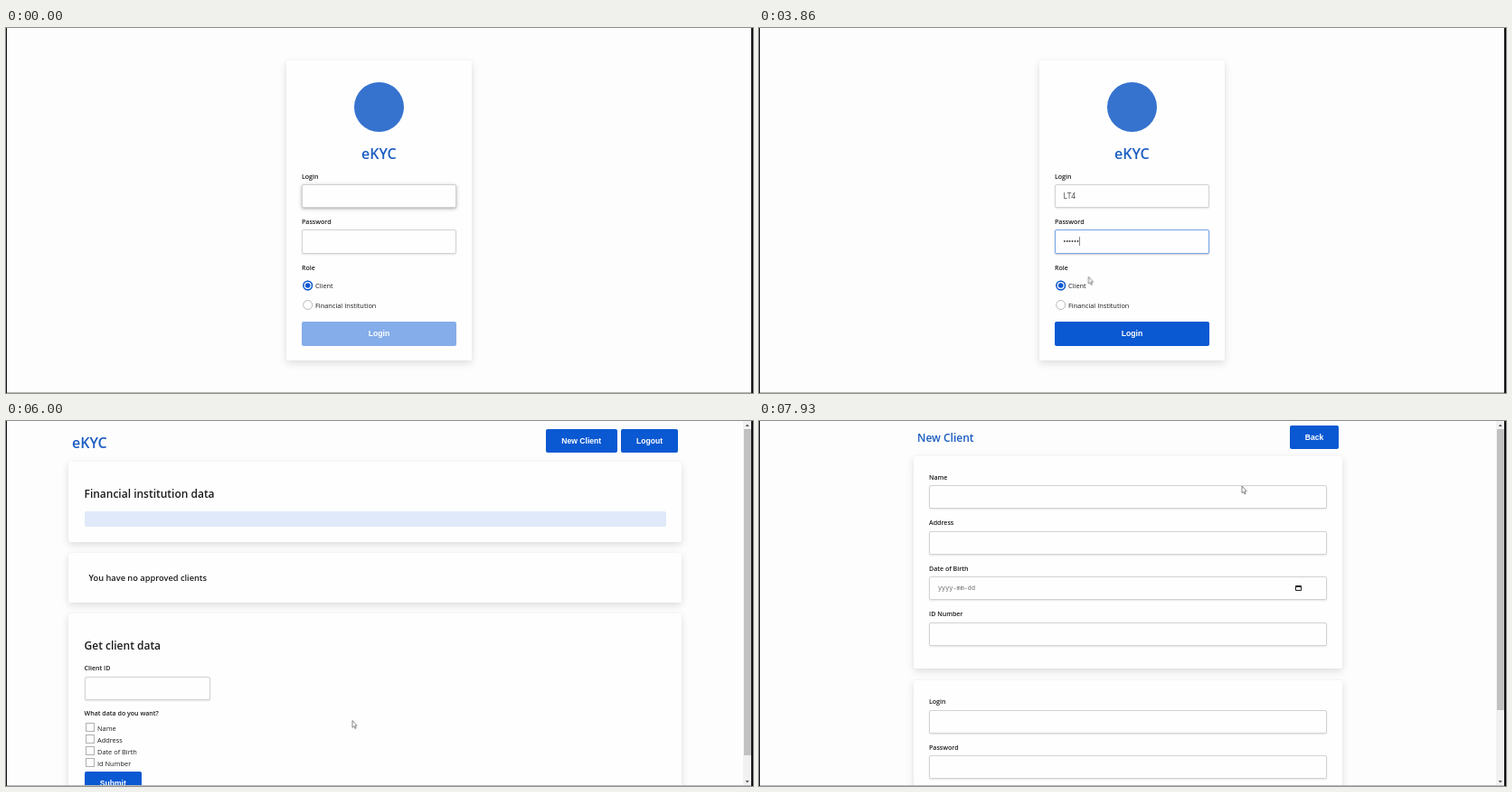
An HTML page for the animation above (8000 ms loop, 826x404 px).

```html
<!DOCTYPE html>
<html lang="en">
<head>
<meta charset="utf-8">
<title>eKYC</title>
<style>
html, body { margin: 0; width: 100%; height: 100%; overflow: hidden; background: #fdfdfd; }
body { position: relative; font-family: "Open Sans", "Noto Sans", sans-serif; color: #1c1c1c; --blue: #0a58d2; }
body * { box-sizing: border-box; }
.page, .group, .abs, p, .card, .input, .btn, .check { position: absolute; }
.page, .group { inset: 0; }

/* everything is placed by --x --y --w --h; text is centred on --y */
.abs, p, .card, .input, .btn, .check {
  left: calc(var(--x) * 1px); top: calc(var(--y) * 1px);
  width: calc(var(--w) * 1px); height: calc(var(--h) * 1px);
}
p { margin: -10px 0 0; width: auto; height: 20px; line-height: 20px; font-size: 7.4px; white-space: pre; }
.label { font-size: 7.05px; font-weight: 600; }
.title { font-size: 12px; font-weight: 600; }
.lead { font-size: 9.25px; font-weight: 600; }
.value { font-size: 8.2px; color: #333; }
.key { font-size: 8.1px; font-weight: 600; }
.brand { font-size: 16px; font-weight: 600; color: #1b5cc2; }
.card { background: #fefefe; border-radius: 2px; box-shadow: 0 3px 9px rgba(0,0,0,.13), 0 0 2px rgba(0,0,0,.06); }
.input { border: 1px solid #d2d2d2; border-radius: 2px; background: #fefefe; box-shadow: 0 1px 2px rgba(0,0,0,.1); }
.btn {
  display: flex; align-items: center; justify-content: center; border-radius: 2px; background: var(--blue);
  color: #fff; font: bold 8.6px "Liberation Sans", Arial, sans-serif;
}
.off { fill: #fefefe; stroke: #b0b0b0; stroke-width: .9; }
.over { fill: #fefefe; stroke: #1a5cc8; stroke-width: 1.3; }
.on { fill: #fefefe; stroke: var(--blue); stroke-width: 1.5; }
.dot { fill: var(--blue); }
.check { --x: 88; --w: 10; --h: 10; border: 1px solid #b0b0b0; }
.typed { height: 10px; line-height: 10px; font-size: 8.3px; color: #444; overflow: hidden; white-space: pre; border-right: 1px solid transparent; }
.secret { font: 7.2px/10px "Liberation Sans", Arial, sans-serif; letter-spacing: .42px; }

/* one shared loop */
.step, .move { animation: 8s step-end infinite; }
.move { animation-timing-function: ease-in-out; }
.login { animation-name: login; }
.dash { animation-name: dash; }
.new { animation-name: new; }
.waiting { animation-name: waiting; }
.loaded { animation-name: loaded; }
.shift { animation-name: shift; }
.track { animation-name: track; }
.thumb { animation-name: thumb; }
.hovered { animation-name: hovered; }
.focus1 { animation-name: focus1; }
.focus2 { animation-name: focus2; }
.user { animation-name: user; }
.secret { animation-name: secret; }
.client { animation-name: client; }
.inst { animation-name: inst; }
.inst-over { animation-name: instOver; }
.send { animation-name: send; animation-timing-function: linear; }
.send-text { animation-name: sendText; }
.busy { animation-name: busy; }
.cursor { left: 0; top: 0; animation-name: cursor; }
.ring { animation-name: ring; animation-timing-function: linear; }
.dark { animation-name: dark; }
.arrow { animation-name: arrow; }
.hand { animation-name: hand; }
.back { animation-name: back; animation-timing-function: linear; }

@keyframes login { 0% { opacity: 1 } 65.75%, 100% { opacity: 0 } }
@keyframes dash { 0% { opacity: 0 } 65.75% { opacity: 1 } 90.4%, 100% { opacity: 0 } }
@keyframes new { 0% { opacity: 0 } 90.4%, 100% { opacity: 1 } }
@keyframes waiting { 0% { opacity: 1 } 76.6%, 100% { opacity: 0 } }
@keyframes loaded { 0% { opacity: 0 } 76.6%, 100% { opacity: 1 } }
@keyframes shift { 0% { transform: none } 76.6%, 100% { transform: translateY(32px) } }
@keyframes track { 0% { opacity: 0 } 65.75%, 100% { opacity: 1 } }
@keyframes thumb {
  0% { opacity: 0; height: 361px } 65.75% { opacity: 1; height: 361px }
  76.6% { opacity: 1; height: 337px } 90.4%, 100% { opacity: 1; height: 311px }
}
@keyframes hovered { 0% { opacity: 1 } 43.75%, 100% { opacity: 0 } }
@keyframes focus1 { 0% { opacity: 0 } 8.25% { opacity: 1 } 26.6%, 100% { opacity: 0 } }
@keyframes focus2 { 0% { opacity: 0 } 26.6% { opacity: 1 } 55%, 100% { opacity: 0 } }
@keyframes user {
  0% { width: 1px; border-color: transparent } 8.25% { width: 1px; border-color: #888 }
  15% { width: 1px; border-color: transparent } 15.8% { width: 5.6px; border-color: #888 }
  16.6% { width: 10px; border-color: #888 } 17.5% { width: 16px; border-color: #888 }
  24.1%, 100% { width: 16px; border-color: transparent }
}
@keyframes secret {
  0% { width: 1px; border-color: transparent } 26.6% { width: 1px; border-color: #888 }
  33.2% { width: 1px; border-color: transparent } 35.7% { width: 4px; border-color: #888 }
  36.6% { width: 7px; border-color: #888 } 37.4% { width: 9.9px; border-color: #888 }
  40.7% { width: 12.8px; border-color: #888 } 41.6% { width: 15.8px; border-color: #888 }
  42.5% { width: 18.8px; border-color: #888 } 49.1%, 100% { width: 18.8px; border-color: transparent }
}
@keyframes client { 0% { opacity: 1 } 56.6%, 100% { opacity: 0 } }
@keyframes inst { 0% { opacity: 0 } 56.6%, 100% { opacity: 1 } }
@keyframes instOver { 0% { opacity: 0 } 50.8% { opacity: 1 } 56.6%, 100% { opacity: 0 } }
@keyframes send {
  0%, 42.5% { background: #84ade9 } 44.5%, 62.9% { background: #0a58d2 }
  63.8%, 100% { background: #3273da }
}
@keyframes sendText { 0% { opacity: 1 } 63.3%, 100% { opacity: 0 } }
@keyframes busy { 0% { opacity: 0 } 63.3%, 100% { opacity: 1 } }
@keyframes spin { to { transform: rotate(1turn) } }
@keyframes cursor {
  0%, .75% { transform: translate(358px, 196px) }
  4.1%, 42% { transform: translate(352px, 190px) }
  51.6%, 56.6% { transform: translate(368.5px, 304px) }
  61.5% { transform: translate(383px, 331.5px) }
  75.5% { transform: translate(383px, 331.5px); animation-timing-function: ease-in }
  82.5% { transform: translate(578px, 116px); animation-timing-function: ease-out }
  86.5%, 94.5% { transform: translate(634px, 22px) }
  99.1%, 100% { transform: translate(534px, 72px) }
}
@keyframes ring {
  0%, 8.24% { opacity: 0; transform: scale(1) }
  8.25% { opacity: .7; transform: scale(1) } 11.5% { opacity: 1; transform: scale(.35) }
  11.51%, 54.98% { opacity: 0; transform: scale(1) }
  54.99% { opacity: .7; transform: scale(1) } 58.25% { opacity: 1; transform: scale(.35) }
  58.26%, 62.49% { opacity: 0; transform: scale(1) }
  62.5% { opacity: .7; transform: scale(1) } 65.75% { opacity: 1; transform: scale(.35) }
  65.76%, 87.49% { opacity: 0; transform: scale(1) }
  87.5% { opacity: .7; transform: scale(1) } 90.75% { opacity: 1; transform: scale(.35) }
  90.76%, 100% { opacity: 0; transform: scale(1) }
}
@keyframes dark { 0% { opacity: 0 } .75% { opacity: 1 } 42.5%, 100% { opacity: 0 } }
@keyframes arrow {
  0% { opacity: 0 } 42.5% { opacity: 1 } 50.8% { opacity: 0 } 58.2% { opacity: 1 }
  60.2% { opacity: 0 } 65.75% { opacity: 1 } 85.4% { opacity: 0 } 96%, 100% { opacity: 1 }
}
@keyframes hand {
  0% { opacity: 0 } 50.8% { opacity: 1 } 58.2% { opacity: 0 } 60.2% { opacity: 1 }
  65.75% { opacity: 0 } 85.4% { opacity: 1 } 96%, 100% { opacity: 0 }
}
@keyframes back { 0%, 96.5% { background: #2f70d9 } 98.5%, 100% { background: #0a58d2 } }
</style>
</head>
<body>

<section class="page step login">
  <div class="card" style="--x:310;--y:36;--w:205;--h:332"></div>
  <div class="abs" style="--x:385;--y:60;--w:55;--h:55;border-radius:50%;background:#3673cf"></div>
  <p class="brand" style="--x:393;--y:138.5">eKYC</p>

  <p class="label" style="--x:327;--y:163.5">Login</p>
  <div class="input" style="--x:327;--y:173;--w:171;--h:26"></div>
  <div class="input step hovered" style="--x:327;--y:173;--w:171;--h:26;box-shadow:0 1px 4px rgba(0,0,0,.26)"></div>
  <div class="input step focus1" style="--x:327;--y:173;--w:171;--h:26;border-color:#74a3e8"></div>
  <div class="abs typed step user" style="--x:336.5;--y:181">LT4</div>

  <p class="label" style="--x:327;--y:214">Password</p>
  <div class="input" style="--x:327;--y:223;--w:171;--h:27"></div>
  <div class="input step focus2" style="--x:327;--y:223;--w:171;--h:27;border-color:#74a3e8"></div>
  <div class="abs typed step secret" style="--x:336.5;--y:231">••••••</div>

  <p class="label" style="--x:327;--y:264.5">Role</p>
  <svg class="abs" style="--x:0;--y:0;--w:826;--h:404">
    <circle class="off" cx="333.7" cy="285" r="5"/>
    <g class="step client"><circle class="on" cx="333.7" cy="285" r="4.8"/><circle class="dot" cx="333.7" cy="285" r="2.8"/></g>
    <circle class="off" cx="333.7" cy="306.5" r="5"/>
    <circle class="over step inst-over" cx="333.7" cy="306.5" r="5"/>
    <g class="step inst"><circle class="on" cx="333.7" cy="306.5" r="4.8"/><circle class="dot" cx="333.7" cy="306.5" r="2.8"/></g>
  </svg>
  <p style="--x:342;--y:285">Client</p>
  <p style="--x:342;--y:306.5">Financial Institution</p>

  <div class="btn move send" style="--x:327;--y:325;--w:171;--h:26.5"><span class="step send-text">Login</span></div>
  <svg class="abs step busy" style="--x:407;--y:333;--w:11;--h:11" viewBox="-5.5 -5.5 11 11">
    <circle r="4" fill="none" stroke="#a9cdf8" stroke-width="1" stroke-dasharray="19 6.1" style="animation:spin .8s linear infinite"/>
  </svg>
</section>

<section class="page step dash">
  <p class="brand" style="--x:73;--y:23.5">eKYC</p>
  <div class="btn" style="--x:597;--y:9;--w:78.5;--h:26">New Client</div>
  <div class="btn" style="--x:680;--y:9;--w:63;--h:26">Logout</div>

  <div class="group step waiting">
    <div class="card" style="--x:69;--y:45;--w:678;--h:89"></div>
    <div class="abs" style="--x:86.5;--y:99.5;--w:643.5;--h:17;border-radius:2px;background:#dfe9fa"></div>
  </div>
  <div class="group step loaded">
    <div class="card" style="--x:69;--y:45;--w:678;--h:121"></div>
    <div class="abs" style="--x:86.5;--y:99.5;--w:643.5;--h:49;border-radius:2px;background:#deebf9"></div>
    <p class="key" style="--x:95;--y:116.5">Name</p>
    <p class="value" style="--x:184;--y:117">LT4</p>
    <p class="key" style="--x:95;--y:131.5">Id Number</p>
    <p class="value" style="--x:184;--y:132">980237234</p>
  </div>
  <p class="title" style="--x:86.5;--y:81">Financial institution data</p>

  <div class="group step shift">
    <div class="card" style="--x:69;--y:145.5;--w:678;--h:55.5"></div>
    <p class="lead step waiting" style="--x:91.5;--y:173.5">You have no approved clients</p>
    <p class="lead step loaded" style="--x:91.5;--y:173.5">Your approved clients:</p>
    <p class="value step loaded" style="--x:198;--y:173">LESSEE2, LESSEE4, LESSEE7, LESSEE8</p>

    <div class="card" style="--x:69;--y:212.5;--w:678;--h:230"></div>
    <p class="title" style="--x:86.5;--y:249">Get client data</p>
    <p class="label" style="--x:86.5;--y:273">Client ID</p>
    <div class="input" style="--x:86.5;--y:282.5;--w:139.5;--h:26"></div>
    <p class="label" style="--x:86.5;--y:323">What data do you want?</p>
    <div class="check" style="--y:334"></div><p style="--x:101;--y:339.5">Name</p>
    <div class="check" style="--y:347"></div><p style="--x:101;--y:352.5">Address</p>
    <div class="check" style="--y:360"></div><p style="--x:101;--y:365.5">Date of Birth</p>
    <div class="check" style="--y:373"></div><p style="--x:101;--y:378.5">Id Number</p>
    <div class="btn" style="--x:86.5;--y:388;--w:63.5;--h:26">Submit</div>
  </div>
</section>

<section class="page step new">
  <p class="title" style="--x:175;--y:19;color:#1b5cc2">New Client</p>
  <div class="btn move back" style="--x:587;--y:5;--w:54;--h:26">Back</div>

  <div class="card" style="--x:171;--y:38.5;--w:474;--h:235.5"></div>
  <p class="label" style="--x:188;--y:61.5">Name</p>
  <div class="input" style="--x:188;--y:71;--w:440;--h:26"></div>
  <p class="label" style="--x:188;--y:112">Address</p>
  <div class="input" style="--x:188;--y:121.5;--w:440;--h:26"></div>
  <p class="label" style="--x:188;--y:162.5">Date of Birth</p>
  <div class="input" style="--x:188;--y:172;--w:440;--h:26"></div>
  <p style="--x:198;--y:185;font-family:'Liberation Mono',monospace;font-size:6.85px;color:#666">yyyy-mm-dd</p>
  <div class="abs" style="--x:592.5;--y:181.5;--w:7;--h:6.5;border:1px solid #222;border-top-width:2px;border-radius:1px"></div>
  <p class="label" style="--x:188;--y:213">ID Number</p>
  <div class="input" style="--x:188;--y:222.5;--w:440;--h:26"></div>

  <div class="card" style="--x:171;--y:286.5;--w:474;--h:150"></div>
  <p class="label" style="--x:188;--y:310">Login</p>
  <div class="input" style="--x:188;--y:319.5;--w:440;--h:26"></div>
  <p class="label" style="--x:188;--y:360.5">Password</p>
  <div class="input" style="--x:188;--y:370;--w:440;--h:26"></div>
</section>

<!-- scrollbar -->
<div class="abs step track" style="--x:815;--y:0;--w:9;--h:403;background:#f1f1f1">
  <svg width="9" height="403" style="display:block"><path d="M2.7 6 4.7 3.5 6.7 6zM2.7 398 4.7 400.5 6.7 398z" fill="#555"/></svg>
</div>
<div class="abs step thumb" style="--x:816;--y:9;--w:7.5;background:#c1c1c1"></div>

<!-- pointer, with its tip at the origin -->
<div class="abs move cursor">
  <div class="abs move ring" style="--x:-18.5;--y:-18.5;--w:37;--h:37;border:3px solid #d92b45;border-radius:50%"></div>
  <svg class="abs" style="--x:0;--y:0;--w:1;--h:1;overflow:visible">
    <path class="step dark" d="M0 0V7.2L1.7 5.7 2.8 8 3.8 7.5 2.8 5.3H4.6Z" fill="#111"/>
    <path class="step arrow" d="M0 0V7.8L1.8 6.2 3 9 4.2 8.4 3 5.8H5.2Z" fill="#fff" stroke="#555" stroke-width=".7"/>
    <path class="step hand" d="M-1 1a1 1 0 0 1 2 0V4.6L4.2 5.4Q5.3 5.8 5.1 7.4L4.6 9.6 4 12H-.8L-3.4 7.8Q-3.7 6.2-2.3 6.5L-1 7.5Z" fill="#fff" stroke="#666" stroke-width=".6"/>
  </svg>
</div>

<!-- window edges -->
<div class="abs" style="--x:0;--y:403;--w:826;--h:1;background:#b5b5b5"></div>
<div class="abs" style="--x:0;--y:0;--w:1;--h:404;background:#111"></div>
<div class="abs" style="--x:824;--y:0;--w:2;--h:404;background:#111"></div>
</body>
</html>
```
